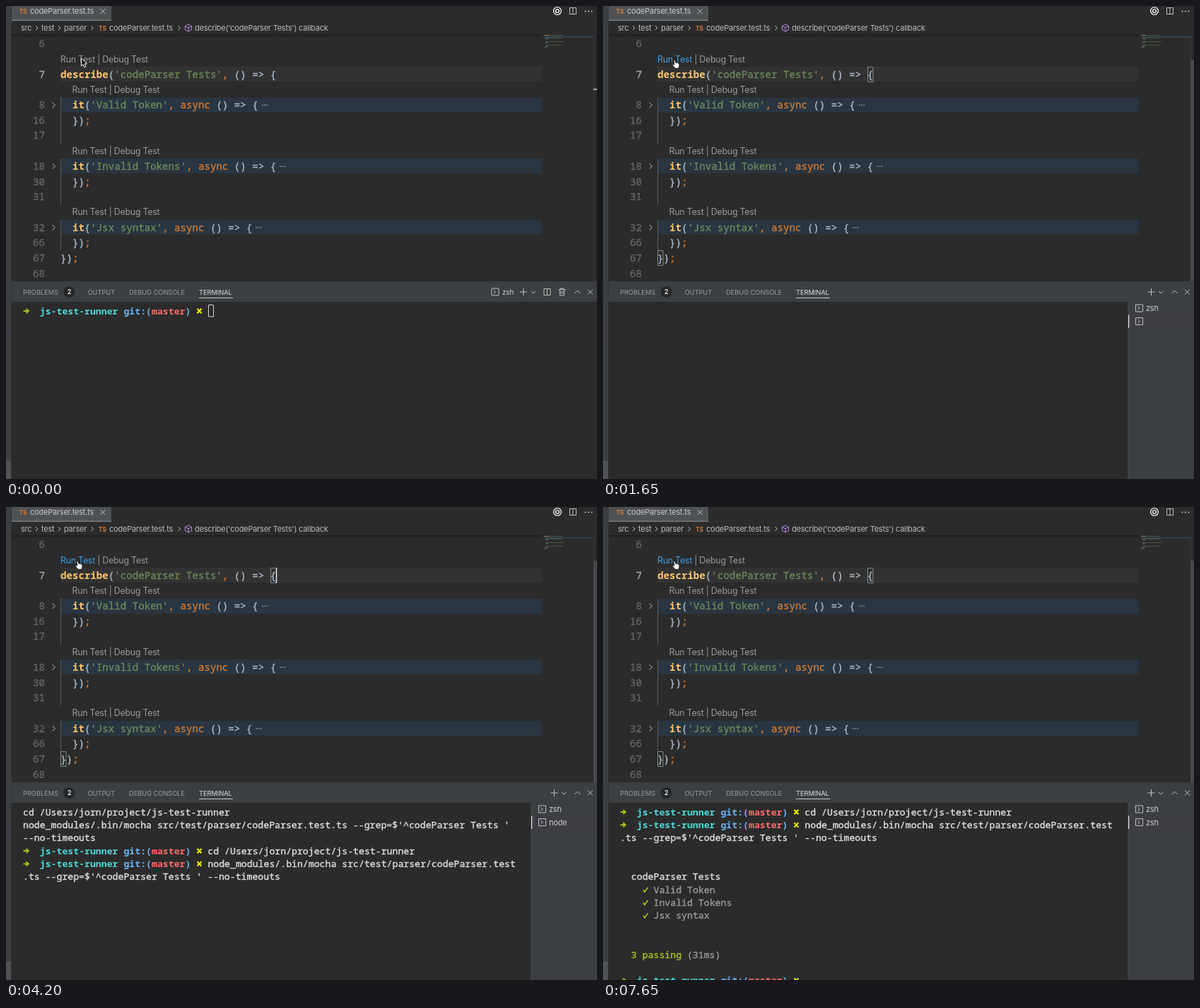
Animation of 836 by 670 pixels, one loop 8000 ms. Source, as an HTML page:

```html
<!DOCTYPE html>
<html lang="en">
<head>
<meta charset="utf-8">
<title>Running tests from the editor</title>
<style>
  html, body { margin: 0; width: 100%; height: 100%; overflow: hidden; background: #2b2b2b; }
  svg { display: block; width: 836px; height: 670px; }
  text { white-space: pre; }
  .ui { font-family: Inter, sans-serif; letter-spacing: -.02em; }
  .mono { font-family: "Noto Sans Mono", monospace; stroke-width: .4; font-variant-ligatures: none; }
  .icon { fill: none; stroke: #c0c0c0; stroke-width: 1; }
</style>
</head>
<body>
<svg id="stage" viewBox="0 0 836 670" xmlns="http://www.w3.org/2000/svg"></svg>
<script>
const LOOP = 8000;
const CODE = { x: 77, top: 53.6, row: 21.68, size: 14.13, col: 8.48 };
const TERM = { x: 24, top: 432, row: 18.36, size: 13.2, col: 7.92 };
const C = {
  fg: '#a9b7c6', string: '#6a8759', key: '#cc7832', func: '#ffc66d', lens: '#999999',
  link: '#3f9be0', out: '#dcdcdc', dim: '#999999', green: '#a8c023', cyan: '#4fd8d8',
  blue: '#6cb5f5', red: '#ff6b68', yellow: '#f5f500', bar: '#3c3f41', back: '#2b2b2b', selected: '#3d3d43'
};

const rect = (x, y, w, h, fill, more = '') =>
  `<rect x="${x}" y="${y}" width="${w}" height="${h}" fill="${fill}" ${more}/>`;
const icon = (d, more = '') => `<path class="icon" d="${d}" ${more}/>`;
const show = (spans, content) => `<g data-show="${spans}">${content}</g>`;
const ui = (x, y, text, size = 11, fill = '#bbbbbb', more = '') =>
  `<text class="ui" x="${x}" y="${y}" font-size="${size}" fill="${fill}" ${more}>${text}</text>`;
const escape = s => s.replace(/&/g, '&amp;').replace(/</g, '&lt;');

// Regular text gets a hairline stroke for a medium weight.
const mono = (x, y, size, parts) =>
  `<text class="mono" x="${x}" y="${y}" font-size="${size}">` +
  parts.map(([s, fill, weight = 400]) =>
    `<tspan fill="${fill}" stroke="${weight > 400 ? 'none' : fill}" font-weight="${weight}">${escape(s)}</tspan>`
  ).join('') + '</text>';

const right = (x, y, r = 3) => icon(`M${x - r / 2} ${y - r}l${r} ${r}l${-r} ${r}`);
const down = (x, y) => icon(`M${x - 3} ${y - 1.5}l3 3l3-3`);
const up = (x, y) => icon(`M${x - 4} ${y + 2}l4-4l4 4`);
const close = (x, y) => icon(`M${x - 3.5} ${y - 3.5}l7 7m0-7l-7 7`);
const plus = (x, y) => icon(`M${x - 5} ${y}h10m-5-5v10`);
const split = (x, y) => icon(`M${x - 4.5} ${y - 4.5}h9v9h-9zm4.5 0v9`);
const trash = (x, y) =>
  icon(`M${x - 5} ${y - 3.5}h10m-7 0v-1.5h4v1.5m-5.5 0l.5 8.5h6l.5-8.5m-4.8 2v4.5m2.6-4.5v4.5`);
const shell = (x, y) =>
  icon(`M${x - 5} ${y - 5}h10v10h-10zM${x - 2} ${y - 2.5}l2.7 2.5l-2.7 2.5`);

// Editor
const rowY = i => CODE.top + i * CODE.row;
const codeLine = (i, indent, parts) =>
  mono(CODE.x + indent * CODE.col, rowY(i) + 4.8, CODE.size, parts);
const lineNumber = (i, n) =>
  mono(55 - String(n).length * CODE.col, rowY(i) + 4.8, CODE.size, [[`${n}`, n === 7 ? '#a4a3a3' : '#606366']]);
const lens = (i, x) => ui(x, rowY(i) + 4.3, 'Run Test | Debug Test', 12.4, C.lens);
const rowBack = (i, fill) => rect(77, Math.round(rowY(i) - 10.8), 681, 21, fill);

function testCase(i, title, first, last, gap) {
  const dots = CODE.x + (title.length + 22) * CODE.col + 5;
  const guide = CODE.row * (gap ? 3 : 2);
  return lens(i, 93.5) + rowBack(i + 1, '#293541') + lineNumber(i + 1, first) + right(67.5, rowY(i + 1), 3.8) +
    codeLine(i + 1, 2, [['it', C.func, 700], ['(', C.fg], [`'${title}'`, C.string], [', async', C.key],
      [' () => {', C.fg]]) +
    [0, 3.2, 6.4].map(d => rect(dots + d, rowY(i + 1) - .7, 1.8, 1.6, '#8a8d90')).join('') +
    lineNumber(i + 2, last) + codeLine(i + 2, 2, [['})', C.fg], [';', C.key]]) +
    (gap ? lineNumber(i + 3, gap) : '') +
    rect(77, rowY(i + 1) - 10.8, 1, guide, '#55585a');
}

function minimap() {
  const marks = [[761, 41, 8, C.func], [770, 41, 18, C.string], [763, 44.5, 24, C.string], [763, 46, 4, C.fg],
    [763, 50, 27, C.string], [763, 51.5, 4, C.fg], [763, 55, 24, C.string], [763, 56.5, 4, C.fg], [761, 58.5, 4, C.fg]];
  return rect(761, 43.2, 70, 1.2, '#2f506c') +
    marks.map(([x, y, w, fill]) => rect(x, y, w, 1, fill, 'opacity=".5"')).join('');
}

const editor = () =>
  rowBack(2, '#323232') + lineNumber(0, 6) +
  show('0-300', lens(1, 77)) +
  show('300-8000', ui(77, rowY(1) + 4.3, `<tspan fill="${C.link}">Run Test</tspan> | Debug Test`, 12.4, C.lens)) +
  lineNumber(2, 7) +
  codeLine(2, 0, [['describe', C.func, 700], ['(', C.fg], ["'codeParser Tests'", C.string], [',', C.key],
    [' () => {', C.fg]]) +
  testCase(3, 'Valid Token', 8, 16, 17) +
  testCase(7, 'Invalid Tokens', 18, 30, 31) +
  testCase(11, 'Jsx syntax', 32, 66) +
  lineNumber(14, 67) + codeLine(14, 0, [['})', C.fg], [';', C.key]]) + lineNumber(15, 68) +
  rect(8, 40, 749, 4, 'url(#shade)') + minimap() + rect(831, 41, 1, 349, '#38393a') +
  show('0-300', rect(831, 117, 5, 2, '#a8a8a8')) +
  show('300-8000', rect(831, 76, 5, 314, '#48494a') +
    ['374.5 86.5', '77.5 346.5'].map(p => icon(`M${p}h7.5v21h-7.5z`, 'style="stroke:#828a88"')).join('')) +
  show('300-1050 1200-1650 2250-2700 3150-3750 4200-4650 5250-5700 6150-6750 7200-7650',
    rect(382, 86, 1.3, 22, '#e0e0e0'));

const header = () =>
  rect(8, 0, 141, 21, '#4e5254') + rect(8, 19.5, 141, 1.5, '#747a80') +
  ui(18.5, 10.8, 'TS', 8.5, '#d0783a', 'font-weight="700"') + ui(34, 11.3, 'codeParser.test.ts', 11, '#c8c8c8') +
  close(137, 7.5) +
  '<g fill="none" stroke="#eee" stroke-width="1.4"><circle cx="780" cy="7" r="5.4"/><circle cx="780" cy="7" r="2.4"/></g>' +
  split(802, 7) + [819.5, 824, 828.5].map(x => `<circle cx="${x}" cy="7.5" r="1" fill="#ccc"/>`).join('') +
  [[21, 'src'], [50, 'test'], [82, 'parser'], [146, 'codeParser.test.ts'],
    [267, "describe('codeParser Tests') callback"]].map(([x, s]) => ui(x, 35, s)).join('') +
  [43.5, 75.5, 122, 245].map(x => right(x, 31)).join('') +
  ui(131, 34.5, 'TS', 8.5, '#d0783a', 'font-weight="700"') +
  icon('M258 26l4.5 2.4v5.2l-4.5 2.4l-4.5-2.4v-5.2zM253.5 28.4l4.5 2.4l4.5-2.4M258 30.8v5.2', 'style="stroke:#b18be0"');

// Terminal
const termY = i => TERM.top + i * TERM.row;
const out = (i, col, ...parts) => mono(TERM.x + col * TERM.col, termY(i) + 4.6, TERM.size, parts);
const plain = (i, col, s, fill = C.out) => out(i, col, [s, fill]);
const prompt = i => {
  const y = termY(i);
  return `<path d="M24.5 ${y}h7m-3-3l3.3 3l-3.3 3" fill="none" stroke="${C.green}" stroke-width="2"/>` +
    out(i, 3, ['js-test-runner ', C.cyan, 700], ['git:(', C.blue, 700], ['master', C.red, 700], [')', C.blue, 700]) +
    `<path d="M270.5 ${y - 3.2}l6 6.4m0-6.4l-6 6.4" fill="none" stroke="${C.yellow}" stroke-width="2"/>`;
};
const passed = (i, name) =>
  `<path d="M57 ${termY(i)}l2 3l4.5-6.5" fill="none" stroke="${C.green}" stroke-width="1.7"/>` + plain(i, 6, name, C.dim);

const cd = 'cd /Users/jorn/project/js-test-runner';
const mocha = 'node_modules/.bin/mocha src/test/parser/codeParser';
const grep = ".ts --grep=$'^codeParser Tests '";

const log = () =>
  show('1800-8000', plain(0, 0, cd) + plain(1, 0, mocha + '.test' + grep) + plain(2, 0, '--no-timeouts')) +
  show('3300-8000', prompt(3) + plain(3, 33, cd) + prompt(4) + plain(4, 33, mocha)) +
  show('3450-8000', plain(4, 83, '.test') + plain(5, 0, grep + ' --no-timeouts')) +
  show('5850-8000', plain(8, 2, 'codeParser Tests') +
    ['Valid Token', 'Invalid Tokens', 'Jsx syntax'].map((name, i) => passed(9 + i, name)).join('')) +
  show('6000-8000', out(14, 2, ['3 passing', C.green], [' (31ms)', C.dim]) + prompt(16));

const panel = () =>
  rect(8, 390, 828, 29, C.bar) +
  [[24, 'PROBLEMS'], [115.5, 'OUTPUT'], [174, 'DEBUG CONSOLE'], [273, 'TERMINAL']].map(([x, s]) =>
    ui(x, 408.8, s, 9.3, s === 'TERMINAL' ? '#dddddd' : '#999c9e', 'style="letter-spacing:-.005em"')).join('') +
  rect(273, 413, 48, 1, '#c8c8c8') +
  '<circle cx="89.5" cy="405" r="8" fill="#242627"/>' +
  ui(89.5, 408.4, '2', 9.3, '#eeeeee', 'text-anchor="middle" font-weight="600"') +
  up(808.5, 405) + close(826.5, 405) +
  show('0-450', shell(692, 405) + ui(702, 408.6, 'zsh', 10, '#d0d0d0')) +
  show('0-1050', plus(732, 405) + down(746, 405.5) + split(765.5, 405) + trash(786.5, 405)) +
  show('1050-8000', plus(775.5, 405) + down(789, 405.5)) +
  show('0-450', prompt(0) + icon('M286.5 423.5h7v16.5h-7z', 'style="stroke:#d6d6d6"')) +
  `<g clip-path="url(#screen)"><g id="log">${log()}</g></g>` +
  show('450-8000', rect(743, 419, 93, 251, C.bar) + rect(742.5, 419, 1, 251, '#4a4d4f') +
    rect(743, 437.5, 93, 18.5, C.selected) + rect(743, 437.5, 1.3, 18.5, '#dddddd') +
    shell(758.5, 428) + ui(768, 432, 'zsh', 11, '#cccccc')) +
  show('1200-8000', shell(758.5, 446.5)) +
  show('1800-3600 6000-8000', ui(768, 450.5, 'zsh', 11, '#cccccc')) +
  show('3600-6000', ui(768, 450.5, 'node', 11, '#cccccc'));

const arrow = x =>
  `<path transform="translate(${x} 73.5)" d="M.5 .5v11l2.6-2.3l1.8 4.1l2-.9l-1.8-4h3.6z" fill="#111" stroke="#fff"/>`;
const hand = x =>
  `<path transform="translate(${x} 75.5)" d="M2.4 1.2q1.1-1.2 2 .2l.9 3.4q1.2-.8 1.8.3q1.1-.6 1.7.5q1.3-.3 1.5 1
  l.2 3l-1 3.2h-5l-3.3-4q-1.3-1.6.2-2.1l2 1z" fill="#fff" stroke="#111" stroke-width=".9"/>`;

const stage = document.getElementById('stage');
stage.innerHTML =
  `<defs><linearGradient id="shade" x2="0" y2="1"><stop stop-opacity=".35"/><stop offset="1" stop-opacity="0"/></linearGradient>
  <clipPath id="screen"><rect x="8" y="421" width="735" height="249"/></clipPath></defs>` +
  rect(0, 0, 836, 670, C.back) + editor() + header() + panel() +
  rect(0, 0, 7.5, 670, C.bar) + rect(0, 452, 7.5, 18.5, C.selected) + rect(0, 644, 7.5, 26, '#505355') +
  rect(7, 0, 1, 670, '#323435') +
  show('0-150', arrow(106)) + show('150-300', arrow(103.5)) +
  show('300-450', hand(99)) + show('450-8000', hand(97.5));

const timed = [...stage.querySelectorAll('[data-show]')].map(node => ({
  node, spans: node.dataset.show.split(' ').map(s => s.split('-').map(Number))
}));
const logNode = document.getElementById('log');

function render(t) {
  for (const { node, spans } of timed) {
    const on = spans.some(([from, to]) => t >= from && t < to);
    node.setAttribute('display', on ? 'inline' : 'none');
  }
  logNode.setAttribute('transform', `translate(0 ${t >= 6000 ? -3 * TERM.row : 0})`);
}

const start = performance.now();
function tick() {
  render((performance.now() - start) % LOOP);
  requestAnimationFrame(tick);
}
tick();
</script>
</body>
</html>
```
